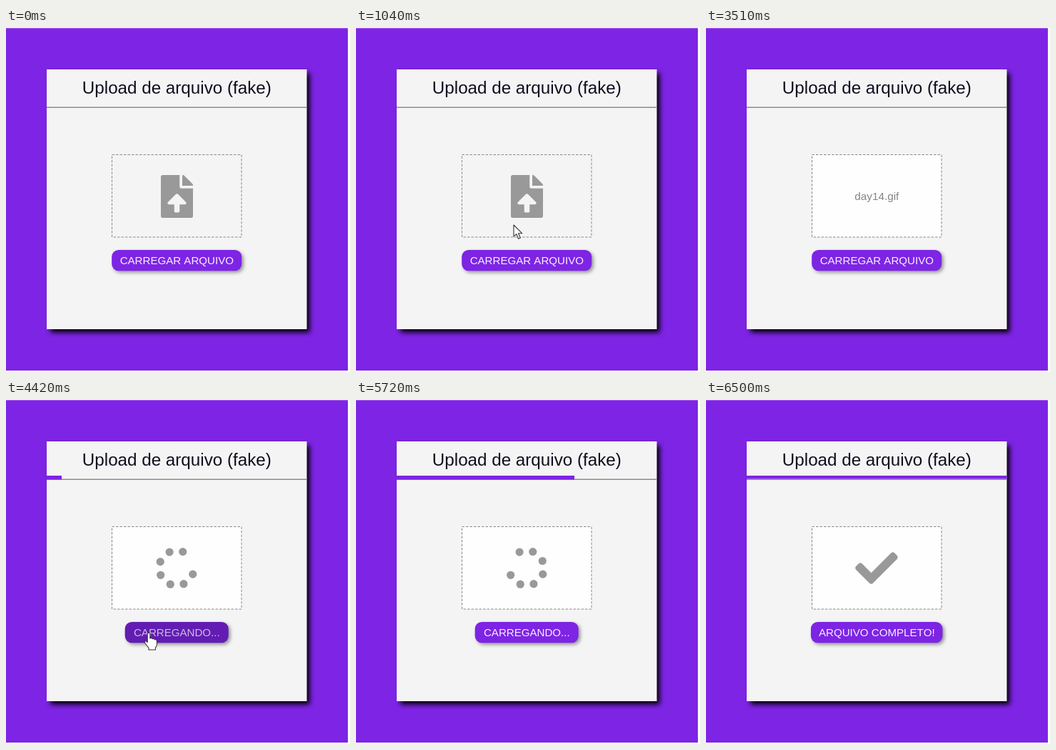
Animation, 482 px wide and 482 px high, one loop 7.28 s. Source, as an HTML page with a canvas:

```html
<!DOCTYPE html>
<html lang="pt-BR">
<head>
<meta charset="utf-8">
<title>Upload de arquivo</title>
<style>
html, body { margin: 0; width: 100%; height: 100%; overflow: hidden; background: #fff; }
canvas { display: block; width: 482px; height: 482px; }
</style>
</head>
<body>
<canvas id="stage" width="482" height="482"></canvas>
<script>
const ctx = document.getElementById('stage').getContext('2d');
const LOOP = 7280, STEP = 130;
const PURPLE = '#7e24e5', PAPER = '#f4f4f4', GREY = '#999';
const CARD = { x: 57, y: 58, w: 364.5, h: 364 };

// Steps at which the upload changes state
const CHOSEN = 27, LOADING = 34, DONE = 50;

// Icons on a 512-unit grid
const FILE = new Path2D('M224 0V136q0 24 24 24H384V488q0 24-24 24H24q-24 0-24-24V24Q0 0 24 0z' +
  'M256 0h6q10 0 17 7l98 98q7 7 7 17v6H256z' +
  'M224 352v80q0 16-16 16h-32q-16 0-16-16v-80H95c-14 0-21-17-11-27l96-96q12-10 24 0l96 96c10 10 3 27-11 27z');
const CHECK = new Path2D('M174 439L7 273q-14-18 0-36l37-36q18-14 36 0L192 313 432 73q18-14 36 0l36 36q14 18 0 36L210 439q-18 14-36 0z');

const ARROW = new Path2D('M0 0V16.2L3.8 12.7 6.6 19.3 9.3 18.2 6.5 11.7H11.6z');
const HAND = new Path2D('M-1.8 1.6Q0-1.2 1.8 1.6V8Q4 6.8 5.2 8.8 7.4 7.8 8.4 9.8 11 9 11.4 11.6V16Q11.4 19 9.4 21V24H0V21.5L-5.6 14Q-5.8 11.4-3.4 11.8L-1.8 13.6z');

// Pointer paths: [step, x, y]
const PATHS = [
  [[1, 466, 470], [3, 330, 400], [4, 262, 360], [5, 221, 339], [6, 221, 322], [9, 221, 253], [14, 221, 253], [16, 221, 249], [22, 221, 249], [23, 280, 300], [25, 468, 464]],
  [[28, 37, 408], [30, 112, 368], [32, 195, 329], [34, 200, 326], [35, 218, 342], [36, 270, 366], [39, 466, 438]]
];

function pointerAt(n) {
  const path = PATHS.find(p => n >= p[0][0] && n <= p[p.length - 1][0]);
  if (!path) return null;
  const i = Math.max(1, path.findIndex(k => k[0] >= n));
  const [a, ax, ay] = path[i - 1], [b, bx, by] = path[i];
  const u = (n - a) / (b - a);
  return { x: ax + (bx - ax) * u, y: ay + (by - ay) * u };
}

function rect(x, y, w, h, fill) {
  ctx.fillStyle = fill;
  ctx.fillRect(x, y, w, h);
}

function shadow(color, offset, blur) {
  ctx.shadowColor = color;
  ctx.shadowOffsetX = ctx.shadowOffsetY = offset;
  ctx.shadowBlur = blur;
}

function text(str, y, size, color) {
  ctx.font = size + 'px "Liberation Sans", Arial, sans-serif';
  ctx.textAlign = 'center';
  ctx.fillStyle = color;
  ctx.fillText(str, 239.3, y);
}

function icon(path, x, y) {
  ctx.save();
  ctx.translate(x, y);
  ctx.scale(60 / 512, 60 / 512);
  ctx.fillStyle = GREY;
  ctx.fill(path, 'evenodd');
  ctx.restore();
}

function spinner(turn) {
  ctx.fillStyle = GREY;
  for (let i = 0; i < 7; i++) {
    const a = (turn + i * 45) * Math.PI / 180;
    ctx.beginPath();
    ctx.arc(239 + 24.4 * Math.cos(a), 235.4 + 24.4 * Math.sin(a), 5.6, 0, 7);
    ctx.fill();
  }
}

function card() {
  rect(0, 0, 479, 480, PURPLE);
  rect(0, 0, 479, 1, 'rgba(255,255,255,.25)');
  ctx.save();
  shadow('#000', 4.5, 7);
  rect(CARD.x, CARD.y, CARD.w, CARD.h, PAPER);
  ctx.restore();
  rect(CARD.x, 110.5, CARD.w, 1.5, '#8c8c8c');
  text('Upload de arquivo (fake)', 92, 24.2, '#100c1e');
}

function dropZone(n) {
  if (n >= CHOSEN) rect(148, 177, 182, 116, '#fefefe');
  ctx.save();
  ctx.strokeStyle = '#8a8a8a';
  ctx.lineWidth = 1;
  ctx.setLineDash([3.5, 2]);
  ctx.strokeRect(148.5, 177.5, 181.5, 115.5);
  ctx.restore();

  if (n < CHOSEN) icon(FILE, 217, 206);
  else if (n < LOADING) text('day14.gif', 240.5, 15.3, '#858585');
  else if (n < DONE) spinner(21 + 22.5 * (n - LOADING));
  else icon(CHECK, 209, 205.5);
}

function button(n, hover) {
  const [label, w] = n < LOADING ? ['CARREGAR ARQUIVO', 182]
    : n < DONE ? ['CARREGANDO...', 145] : ['ARQUIVO COMPLETO!', 184.5];
  ctx.save();
  shadow('rgba(0,0,0,.4)', 2.5, 5);
  ctx.fillStyle = hover ? '#621cb4' : PURPLE;
  ctx.beginPath();
  ctx.roundRect(239.2 - w / 2, 311, w, 29.3, 9.5);
  ctx.fill();
  ctx.restore();
  text(label, 331.4, 15.1, hover ? '#cbbddd' : '#f4efff');
}

function progress(n) {
  if (n < LOADING) return;
  const w = Math.min(CARD.w, 21 + 22.8 * (n - LOADING));
  rect(CARD.x, 106, w, n < DONE ? 5.5 : 4.5, PURPLE);
}

function pointer(p, hover) {
  const shape = hover ? HAND : ARROW;
  ctx.save();
  ctx.translate(p.x, p.y);
  ctx.lineJoin = 'round';
  ctx.lineWidth = 1.1;
  ctx.fillStyle = '#fff';
  ctx.strokeStyle = '#333';
  ctx.fill(shape);
  ctx.stroke(shape);
  ctx.restore();
}

function draw(n) {
  const p = pointerAt(n);
  const hover = p && p.x > 148 && p.x < 330 && p.y > 311 && p.y < 338;
  ctx.clearRect(0, 0, 482, 482);
  card();
  progress(n);
  dropZone(n);
  button(n, hover);
  if (p) pointer(p, hover);
}

let start = null;
function tick(now) {
  if (start === null) start = now;
  draw(Math.floor((now - start) % LOOP / STEP));
  requestAnimationFrame(tick);
}
ctx.fontKerning = 'none';
draw(0);
requestAnimationFrame(tick);
</script>
</body>
</html>
```
